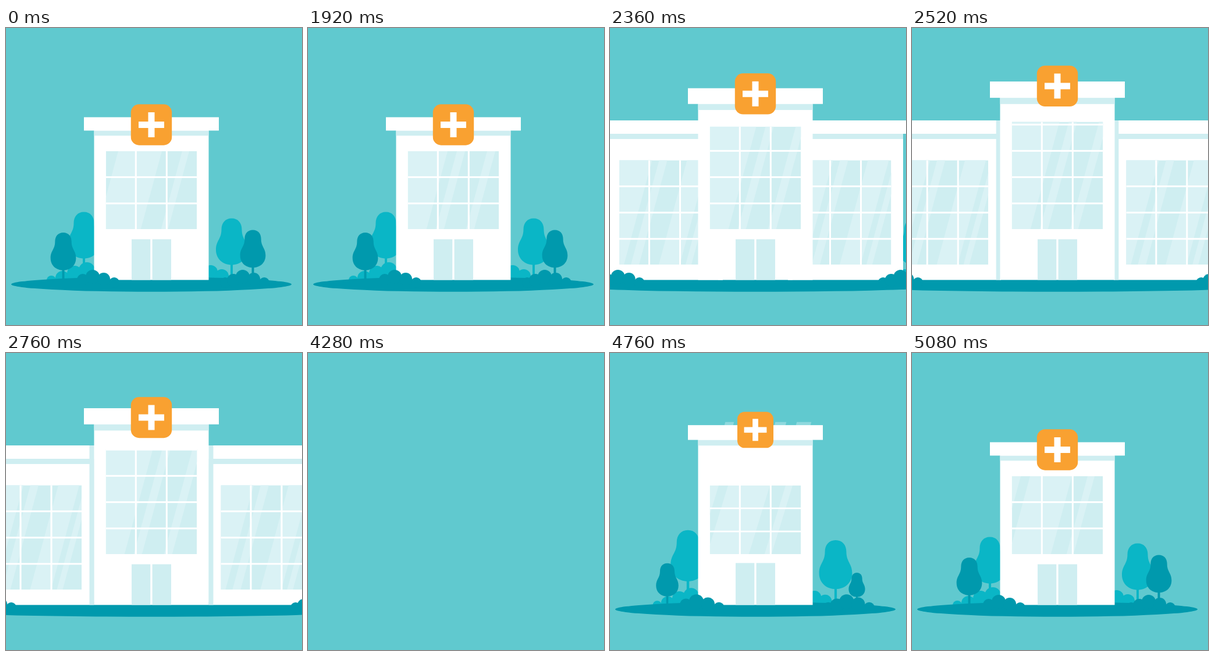
These frames come from a looping animation (509 by 511 pixels, 5680 ms). An HTML page with a canvas:

```html
<!DOCTYPE html>
<html lang="en">
<head>
<meta charset="utf-8">
<title>Hospital</title>
<style>
  html, body { margin: 0; width: 100%; height: 100%; overflow: hidden; background: #60c9cf; }
  canvas { display: block; width: 100vw; height: 100vh; }
</style>
</head>
<body>
<canvas id="stage" width="509" height="511"></canvas>
<script>
const ctx = document.getElementById('stage').getContext('2d');
const LOOP = 5680, STEP = 40, EXPAND = 1920, REBUILD = 4280;
const BASE = 433.5, MID = 250, SLANT = 0.27;
const SKY = '#60c9cf', WHITE = '#fff', PALE = '#cfeef1', SHINE = '#daf2f5',
      ORANGE = '#f9a131', TEAL = '#0ab6c6', DARK = '#0099ad', GHOST = '#8fd9de';

// Shine bands as [left, right] offsets at the foot of a window
const SHINE_REST = [[-15, 60], [95, 107]];
const SHINE_WIDE = [[-100, 32], [48, 62], [100, 114]];
const SHINE_BUILT = [[-100, -21], [-5, 67], [94, 106]];
const SHINE_WING = [[-100, 8], [20, 34], [68, 104], [114, 124]];

// Bushes as circles [x, y, radius]
const BACK_LEFT = [[78, 434, 8], [97, 430, 12], [118, 422, 13], [139, 417, 14]];
const BACK_RIGHT = [[352, 420, 12], [371, 427, 12]];
const FRONT_LEFT = [[132, 433, 10], [149, 428, 12], [168, 432, 11], [186, 438, 9]];
const FRONT_RIGHT = [[377, 438, 9], [391, 434, 11], [407, 428, 12], [426, 432, 11], [444, 438, 9]];

const pear = new Path2D('M0 0C11 0 17.5 8 17.5 19C17.5 36 27 38 27 54C27 70 15 80 0 80' +
                        'C-15 80-27 70-27 54C-27 38-17.5 36-17.5 19C-17.5 8-11 0 0 0Z');

const ease = u => 0.5 - 0.5 * Math.cos(Math.PI * Math.max(0, Math.min(1, u)));

// Rises from 0 to peak, then settles at 1
function spring(t, start, top, peak, end) {
  return t < top ? peak * ease((t - start) / (top - start))
                 : peak + (1 - peak) * ease((t - top) / (end - top));
}

function rect(color, left, top, right, bottom) {
  ctx.fillStyle = color;
  ctx.fillRect(left, top, right - left, bottom - top);
}

function scaled(x, y, sx, sy, draw) {
  if (sx <= 0 || sy <= 0) return;
  ctx.save();
  ctx.translate(x, y);
  ctx.scale(sx, sy);
  ctx.translate(-x, -y);
  draw();
  ctx.restore();
}

function slantedBand(color, left, right, bottom, height) {
  const dx = SLANT * height;
  ctx.fillStyle = color;
  ctx.beginPath();
  ctx.moveTo(left, bottom);
  ctx.lineTo(left + dx, bottom - height);
  ctx.lineTo(right + dx, bottom - height);
  ctx.lineTo(right, bottom);
  ctx.fill();
}

function bush(color, circles, shift, pivot, size) {
  scaled(pivot + shift, BASE, size, size, () => {
    ctx.fillStyle = color;
    for (const [x, y, r] of circles) {
      ctx.beginPath();
      ctx.arc(x + shift, y, r, 0, 2 * Math.PI);
      ctx.fill();
    }
  });
}

function tree(color, x, top, size, grow) {
  scaled(x, BASE, grow, grow, () => {
    rect(color, x - 2, top + 70 * size, x + 2, BASE);
    ctx.save();
    ctx.translate(x, top);
    ctx.scale(size, size);
    ctx.fillStyle = color;
    ctx.fill(pear);
    ctx.restore();
  });
}

function paneGrid(x, top, bottom, bands) {
  const right = x + 156.5;
  ctx.save();
  ctx.beginPath();
  ctx.rect(x, top, right - x, bottom - top);
  ctx.clip();
  rect(PALE, x, top, right, bottom);
  for (const [a, b] of bands) slantedBand(SHINE, x + a, x + b, bottom, 200);
  for (const dx of [51.5, 104.5]) rect(WHITE, x + dx - 1.5, top, x + dx + 1.5, bottom);
  for (let y = bottom - 44.2; y > top; y -= 45.2) rect(WHITE, x, y - 1.5, right, y + 1.5);
  ctx.restore();
}

// Right wing; the left one is the same shell mirrored
function wingShell(inner) {
  rect(WHITE, inner, 159, inner + 198, BASE);
  rect(PALE, inner, 182, inner + 198, 191);
  rect(WHITE, inner, 159, inner + 215, 182);
  rect(PALE, inner, 159, inner + 8, BASE);
}

function wings(offset) {
  const inner = 150.5 + offset;
  wingShell(inner);
  ctx.save();
  ctx.translate(2 * MID, 0);
  ctx.scale(-1, 1);
  wingShell(inner);
  ctx.restore();
  paneGrid(171.5 + offset, 227.5, 407, SHINE_WING);
  paneGrid(171.5 - offset, 227.5, 407, SHINE_WING);
}

function sign(y, size) {
  scaled(MID, y, size, size, () => {
    ctx.fillStyle = ORANGE;
    ctx.beginPath();
    ctx.roundRect(MID - 35.2, y - 35.2, 70.4, 70.4, 14);
    ctx.fill();
    rect(WHITE, MID - 22, y - 5.5, MID + 22, y + 5.5);
    rect(WHITE, MID - 5.5, y - 21.5, MID + 5.5, y + 21.5);
  });
}

function draw(t) {
  const building = t >= REBUILD;
  const wide = building ? 0 : t;
  const build = building ? t : LOOP;

  const sides = spring(wide, 1960, 2550, 1, 2760);
  const tower = spring(wide, 1960, 2520, 1.05, 2760);
  const rows = spring(wide, 1920, 2520, 1.1, 2760);
  const lift = spring(wide, 1980, 2520, 1.2, 2760);

  const ground = spring(build, 4290, 4480, 1.15, 4640);
  const body = spring(build, 4360, 4700, 1.12, 4960);
  const door = spring(build, 4400, 4660, 1.1, 4820);
  const rise = spring(build, 4440, 4740, 1.13, 5000);
  const pop = spring(build, 4520, 4860, 1.1, 5080);
  const backBush = spring(build, 4500, 4840, 1.1, 5080);
  const frontBush = spring(build, 4420, 4700, 1.08, 4840);
  const bands = building ? SHINE_BUILT : t < EXPAND ? SHINE_REST : SHINE_WIDE;
  const shift = 177 * sides;

  rect(SKY, 0, 0, 509, 511);

  tree(TEAL, 134 - shift, 316.5, 1, spring(build, 4440, 4760, 1.1, 5000));
  tree(TEAL, 388 + shift, 327.5, 1, spring(build, 4500, 4800, 1.1, 5040));
  bush(TEAL, BACK_LEFT, -shift, 151, backBush);
  bush(TEAL, BACK_RIGHT, shift, 349, backBush);
  tree(DARK, 98.5 - shift, 352, 0.81, spring(build, 4520, 4860, 1.1, 5080));
  tree(DARK, 424.5 + shift, 347.5, 0.81, spring(build, 4560, 4920, 1.1, 5080));

  ctx.fillStyle = DARK;
  ctx.beginPath();
  ctx.ellipse(MID, 441, (241 + 150 * sides) * ground, 12.8 * ground, 0, 0, 2 * Math.PI);
  ctx.fill();

  if (sides > 0) wings(17 + 181 * sides);

  if (building && rise > body) {
    const top = BASE - 279 * rise;
    for (const [a, b] of [[195, 210], [281, 300], [318, 343]]) {
      slantedBand(GHOST, a, b, top + 12, 12);
    }
  }

  scaled(MID, BASE, 1, (1 + 0.209 * tower) * body, () => {
    rect(WHITE, 151.5, 176, 348.5, BASE);
    rect(PALE, 151.5, 176.5, 348.5, 185.3);
    rect(WHITE, 134, 153.5, 366, 176.5);
  });
  scaled(MID, 346, 1, pop, () => paneGrid(171.8, 212 - 46 * rows, 346, bands));
  scaled(MID, BASE, 1, door, () => {
    rect(PALE, 216, 363.5, 248.3, BASE);
    rect(PALE, 251.6, 363.5, 284, BASE);
  });
  sign(BASE - (267 + 55.5 * lift) * rise, pop);

  bush(DARK, FRONT_LEFT, -shift, 160, frontBush);
  bush(DARK, FRONT_RIGHT, 121 * sides, 410, frontBush);
}

const began = performance.now();
function tick() {
  const t = (performance.now() - began) % LOOP;
  draw(Math.floor(t / STEP) * STEP);
  requestAnimationFrame(tick);
}
tick();
</script>
</body>
</html>
```
